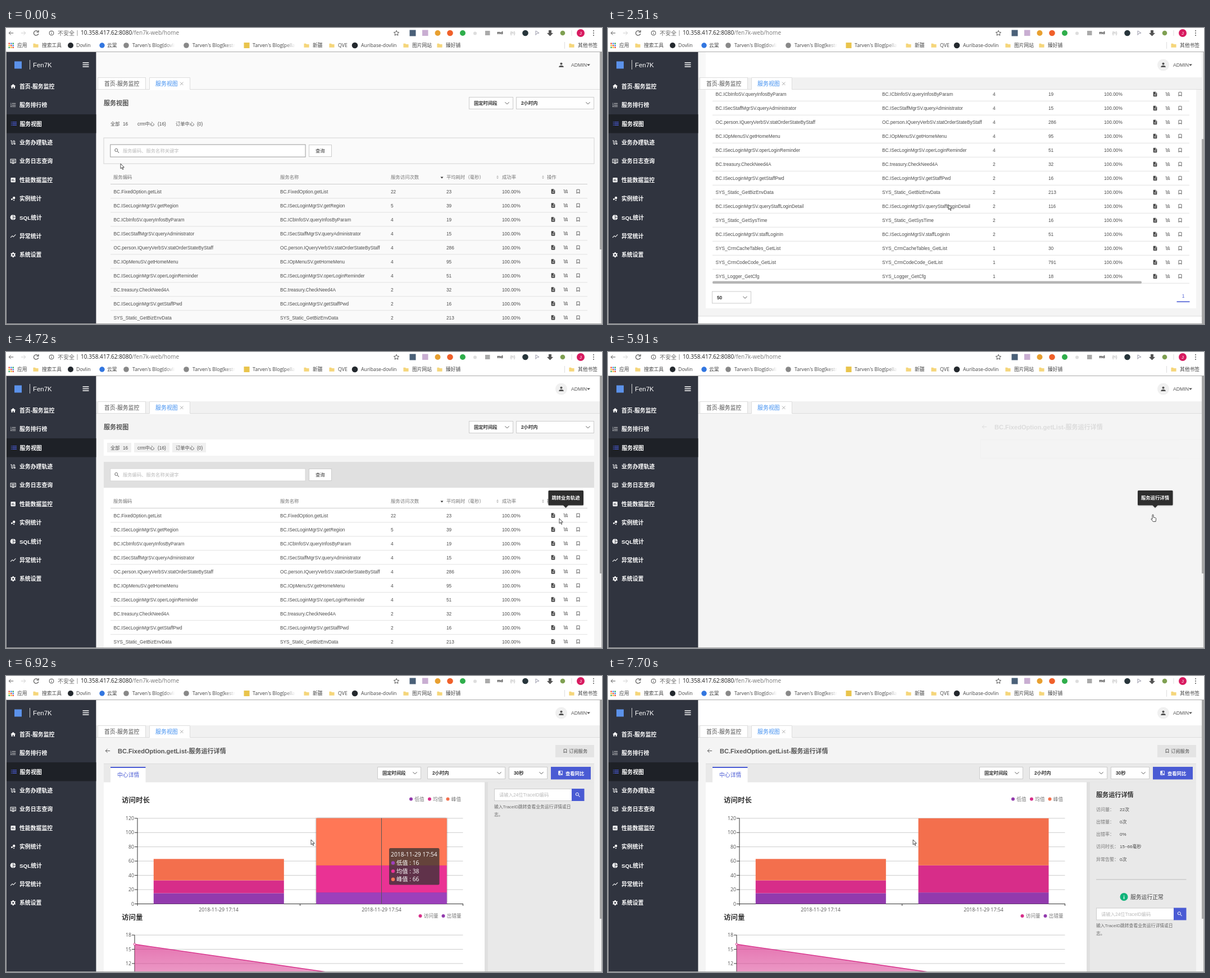
An HTML page that plays this animation: 1061 by 528 pixels, repeating every 8 s.

```html
<!DOCTYPE html>
<html lang="zh">
<head>
<meta charset="utf-8">
<title>服务视图</title>
<style>
html, body { margin: 0; width: 100%; height: 100%; overflow: hidden; background: #fff; }
svg { display: block; width: 1061px; height: 528px; font-family: "Liberation Sans", "Noto Sans CJK SC", sans-serif; }
.ui { font-family: "Open Sans", "Noto Sans CJK SC", sans-serif; }
.page { fill: #f4f4f4; }
.head, .sheet { fill: #fff; }
.strip { fill: #f1f1f1; }
.chip { fill: #f0f0f0; }
.band { fill: #e0e0e0; }
.flat .page, .flat .head, .flat .strip { fill: #fafafa; }
.flat .sheet, .flat .chip, .flat .avatar { fill: none; }
.flat .band { fill: none; stroke: #d4d4d4; }
</style>
</head>
<body>
<svg id="stage" viewBox="0 0 1061 528" xmlns="http://www.w3.org/2000/svg"></svg>
<script>
const BLUE = '#4a5bd4', PURPLE = '#923aad', PINK = '#d72d89', ORANGE = '#f36f4d';
const HOT = ['#9c3fbb', '#ea3094', '#ff7757'], COOL = [PURPLE, PINK, ORANGE];

const rect = (x, y, w, h, fill, more = '') =>
  `<rect x="${x}" y="${y}" width="${w}" height="${h}" ${fill ? `fill="${fill}"` : ''} ${more}/>`;
const box = (x, y, w, h, fill = '#fff', line = '#ccc') => rect(x + .5, y + .5, w - 1, h - 1, fill, `stroke="${line}"`);
const dot = (x, y, r, fill, more = '') => `<circle cx="${x}" cy="${y}" r="${r}" fill="${fill}" ${more}/>`;
const text = (x, y, s, size = 8.3, fill = '#4c4c4c', more = '') =>
  `<text x="${x}" y="${y}" font-size="${size}" fill="${fill}" ${more}>${s}</text>`;
const line = (d, color, w = 1, more = '') => `<path d="${d}" fill="none" stroke="${color}" stroke-width="${w}" ${more}/>`;
const group = (id, body, more = '') => `<g id="${id}" ${more}>${body}</g>`;
const BOLD = 'font-weight="700"', MID = 'text-anchor="middle"', END = 'text-anchor="end"';

// Icon paths on a 24 unit grid; stroked ones start with "~".
const ICONS = {
  home: 'M10 20v-6h4v6h5v-8h3L12 3 2 12h3v8z',
  ranks: 'M2 17h2v.5H3v1h1v.5H2v1h3v-4H2zm1-9h1V4H2v1h1zm-1 3h1.8L2 13.1v.9h3v-1H3.2L5 10.9V10H2zM7 5v2h15V5zm0 14h15v-2H7zm0-6h15v-2H7z',
  list: 'M1 4h3v3H1zm0 6h3v3H1zm0 6h3v3H1zM6 4h17v3H6zm0 6h17v3H6zm0 6h17v3H6z',
  track: '~M2 5h4v11a3 3 0 0 0 6 0V8a3 3 0 0 1 6 0v11M15 16l3 3 3-3',
  log: '~M2 4h20v14H2zM8 21h8M6 9h12M6 13h12',
  stats: 'M19 3H5a2 2 0 0 0-2 2v14a2 2 0 0 0 2 2h14a2 2 0 0 0 2-2V5a2 2 0 0 0-2-2zM9 17H7v-7h2zm4 0h-2V7h2zm4 0h-2v-4h2z',
  bubbles: 'M4 14.4a3.2 3.2 0 1 0 6.4 0 3.2 3.2 0 1 0-6.4 0zm8.8 4a2.2 2.2 0 1 0 4.4 0 2.2 2.2 0 1 0-4.4 0zm-2.4-9.6a4.8 4.8 0 1 0 9.6 0 4.8 4.8 0 1 0-9.6 0z',
  pie: 'M11 2v20a10 10 0 0 1 0-20zm2 0v9h9a10 10 0 0 0-9-9zm0 11v9a10 10 0 0 0 9-9z',
  trend: '~M2 18l7-7 4 4 9-9',
  gear: 'M10 2h4l.6 3 2 1.1 2.9-1 2 3.5-2.3 2v2.8l2.3 2-2 3.5-2.9-1-2 1.1-.6 3h-4l-.6-3-2-1.1-2.9 1-2-3.5 2.3-2v-2.8l-2.3-2 2-3.5 2.9 1 2-1.1zm2 6.5a3.5 3.5 0 1 0 0 7 3.5 3.5 0 0 0 0-7z',
  doc: 'M14 2H6a2 2 0 0 0-2 2v16c0 1.1.9 2 2 2h12a2 2 0 0 0 2-2V8zm2 16H8v-2h8zm0-4H8v-2h8zm-3-5V3.5L18.5 9z',
  mark: 'M17 3H7a2 2 0 0 0-2 2v16l7-3 7 3V5a2 2 0 0 0-2-2zm0 15l-5-2.2L7 18V5h10z',
  search: 'M15.5 14h-.8l-.3-.3A6.5 6.5 0 1 0 9.5 16c1.6 0 3.1-.6 4.2-1.6l.3.3v.8l5 5 1.5-1.5zm-6 0a4.5 4.5 0 1 1 0-9 4.5 4.5 0 0 1 0 9z',
  user: 'M12 12a4 4 0 1 0 0-8 4 4 0 0 0 0 8zm0 2c-2.7 0-8 1.3-8 4v2h16v-2c0-2.7-5.3-4-8-4z',
  folder: 'M1 4h9l2 3h11v14H1z',
  back: '~M22 12H3M11 4l-8 8 8 8',
  compare: 'M10 3H3v18h7v2h2V1h-2zm0 15H5l5-6zM14 3v2h5v13l-5-6v9h7V3z'
};
const icon = (name, x, y, size, color) => {
  const d = ICONS[name], open = d[0] === '~';
  const paint = open ? `fill="none" stroke="${color}" stroke-width="2.3"` : `fill="${color}" fill-rule="evenodd"`;
  return `<path d="${open ? d.slice(1) : d}" ${paint} transform="translate(${x - size / 2} ${y - size / 2}) scale(${size / 24})"/>`;
};
const chevron = (x, y) => line(`M${x - 3.5} ${y - 1.7}l3.5 3.5 3.5-3.5`, '#555');
const select = (x, y, w, s) => box(x, y, w, 22) + text(x + 9, y + 14, s, 8.3, '#333', BOLD) + chevron(x + w - 11, y + 11);

function browserBar() {
  const ink = '#555';
  let s = rect(0, 0, 1061, 43, '#fff') + icon('back', 9, 9, 10, ink) +
    `<g transform="rotate(180 31 9)">${icon('back', 31, 9, 10, '#ccc')}</g>` +
    line('M57 6.5a4.2 4.2 0 1 0 .7 3.5M58 4v3.5h-3.5', ink, 1.2) +
    dot(81, 9, 4, 'none', `stroke="${ink}"`) + line('M81 8.5v2.7M81 6.3v1', ink) +
    text(92, 12.6, '不安全', 10, '#666') + line('M127 4v10', '#999') +
    text(133, 12.3, '10.358.417.62:8080<tspan fill="#777">/fen7k-web/home</tspan>', 10.07, '#222', 'class="ui"') +
    line('M695 4.5l1.4 3 3.2.3-2.4 2.2.7 3.2-2.9-1.7-2.9 1.7.7-3.2-2.4-2.2 3.2-.3z', ink) +
    rect(718.5, 3.5, 11, 11, '#4a6078') + rect(741, 3.5, 10.5, 10.5, '#c9aed2') +
    dot(768.5, 9, 5, '#e8a030') + dot(790.5, 9, 5.3, '#f0602a') + dot(813, 9, 5, '#2fae4b') +
    dot(835, 9.5, 3, '#ddd') + rect(853, 5, 8.5, 8, '#aaa') +
    text(879.5, 11, 'md', 7, '#222', MID + ' ' + BOLD) + text(902, 11, '{n}', 7, '#999', MID) +
    dot(924.5, 9, 5.3, '#27353b') + line('M943 5l6 4-4 .5-2 3z', '#99a') +
    '<path d="M966 4h5v5h3l-5.500 5.500L963 9h3z" fill="#555"/>' + dot(991, 9, 4.3, '#7fa052') +
    line('M1007 4v10', '#ddd') + dot(1023, 9, 7, '#d81b60') + text(1023, 11.8, 'J', 8, '#fff', MID);
  for (const y of [5, 9, 13]) s += dot(1046, y, 1, ink);
  ['#e64c3c', '#3f87e8', '#37a859', '#f2b51d'].forEach((c, i, all) => {
    for (let k = i; k < 9; k += all.length) s += rect(4.5 + k % 3 * 3.5, 26.5 + Math.floor(k / 3) * 3.5, 2.4, 2.4, c);
  });
  const label = (x, str) => text(x, 34.3, str, 8.75, '#444', 'class="ui"');
  const folder = (x, str) => icon('folder', x, 31, 10, '#f5d67b') + label(x + 11, str);
  s += label(20, '应用') + folder(53, '搜索工具') + dot(115, 31, 5, '#24292e') + label(125, 'Dovlin') +
    dot(171, 31, 4.7, '#3276e0') + label(180, '云棠');
  [['dovlin', 225], ['kestro', 332], ['pellan', 439]].forEach(([site, x], i) => {
    s += i < 2 ? dot(x - 11, 31, 4.8, '#888') : rect(x - 15.5, 26, 10, 10, '#e9c44c');
    s += label(x, `Tarven's Blog(${site.slice(0, 5)}`) + rect(x + 58, 24, 24, 14, 'url(#fade)');
  });
  return s + folder(535, '新疆') + folder(580, 'QVE') + dot(621, 31, 5.3, '#24292e') + label(632, 'Auribase-dovlin') +
    folder(712, '图片网站') + folder(772, '臻好铺') + line('M994.500 25v12', '#ddd') + folder(1007, '其他书签') +
    line('M0 42.500H1061', '#aaa');
}

function sidebar() {
  const items = [['home', '首页-服务监控'], ['ranks', '服务排行榜'], ['list', '服务视图'], ['track', '业务办理轨迹'], ['log', '业务日志查询'],
    ['stats', '性能数据监控'], ['bubbles', '实例统计'], ['pie', 'SQL统计'], ['trend', '异常统计'], ['gear', '系统设置']];
  let s = rect(0, 43, 160.4, 485, '#30343f') + rect(0, 154, 160.4, 33.5, '#1e2127') +
    rect(15, 59.5, 13, 13, '#5c92ea') + line('M42.500 57v17', '#ccc') + text(48, 69.5, 'Fen7K', 11.4, '#fff') +
    line('M136.500 62h11M136.500 65.500h11M136.500 69h11', '#fff', 1.6);
  items.forEach(([name, str], i) => {
    const y = 104 + i * 33.4, on = i === 2;
    s += icon(name, on ? 14 : 12.7, y, 11, on ? BLUE : '#fff') + text(on ? 24.5 : 24, y + 3.7, str, 9.85, '#fff', BOLD);
  });
  return s;
}

function header() {
  return rect(160, 43, 897, 45, '', 'class="head"') + group('edge', rect(160, 43, 14, 45, '#f8f8f8')) +
    rect(160, 88, 897, 22, '', 'class="strip"') + dot(988.5, 66, 10.5, '#f0f0f0', 'class="avatar"') +
    icon('user', 988.5, 65.8, 12.5, '#555') + text(1006, 69, 'ADMIN', 8.7, '#555') + '<path d="M1034 64.500h6l-3 3.300z" fill="#555"/>' +
    line('M160 109.500H1057', '#ddd') + box(163, 88, 86, 22, '#fff', '#ddd') + text(175, 102.8, '首页-服务监控', 9.85) +
    rect(255, 88, 73, 23, '#fff') + line('M255.500 110V88.500H327.500V110', '#ddd') + text(266, 102.8, '服务视图', 9.95, '#3e8ef0') +
    line('M310 96.500l5.500 5.500M315.500 96.500l-5.500 5.500', '#999', .8);
}

const ROWS = [['BC.FixedOption.getList', 22, 23], ['BC.ISecLoginMgrSV.getRegion', 5, 39], ['BC.ICbInfoSV.queryInfosByParam', 4, 19],
  ['BC.ISecStaffMgrSV.queryAdministrator', 4, 15], ['OC.person.IQueryVerbSV.statOrderStateByStaff', 4, 286], ['BC.IOpMenuSV.getHomeMenu', 4, 95],
  ['BC.ISecLoginMgrSV.operLoginReminder', 4, 51], ['BC.treasury.CheckNeed4A', 2, 32], ['BC.ISecLoginMgrSV.getStaffPwd', 2, 16],
  ['SYS_Static_GetBizEnvData', 2, 213], ['BC.ISecLoginMgrSV.queryStaffLoginDetail', 2, 116], ['SYS_Static_GetSysTime', 2, 16],
  ['BC.ISecLoginMgrSV.staffLoginIn', 2, 51], ['SYS_CrmCacheTables_GetList', 1, 30], ['SYS_CrmCodeCode_GetList', 1, 791], ['SYS_Logger_GetCfg', 1, 18]];

function footer(y) {
  return rect(160, y, 897, 60, '#fff') + line(`M160 ${y}H1057`, '#ddd');
}

function listPage() {
  let s = text(174, 138, '服务视图', 11.05, '#555', BOLD) + select(824, 123, 79, '固定时间段') + select(908, 123, 139, '2小时内') +
    rect(174, 156, 873, 29, '', 'class="sheet"');
  for (const [x, w, name, cx, n] of [[180, 43, '全部', 208, '16'], [228, 63, 'crm中心', 270, '(16)'], [296, 60, '订单中心', 340, '(0)']])
    s += rect(x, 162, w, 17, '', 'class="chip"') + text(x + 6, 173.5, name) + text(cx, 173.5, n);
  s += rect(174, 196, 873, 46, '', 'class="band"') + rect(174, 242.5, 873, 481, '', 'class="sheet"') +
    group('patchA', rect(186, 230, 347, 12, '#e0e0e0') + rect(184, 243, 350, 23, '#fff')) +
    group('patchB', rect(174, 205, 44, 37, '#e0e0e0') + rect(174, 243, 97, 29, '#fff')) +
    rect(185.8, 208, 347.2, 22, '#fff', 'id="query"') + icon('search', 197.5, 219, 11, '#666') +
    text(208, 222.3, '服务编码、服务名称关键字', 8.3, '#bbb') + box(539, 208, 41, 22) + text(551, 222.3, '查询', 8.3, '#333');
  for (const [x, str] of [[191, '服务编码'], [488, '服务名称'], [685, '服务访问次数'], [784, '平均耗时（毫秒）'], [883, '成功率'], [963, '操作']])
    s += text(x, 269, str, 8.4, '#777');
  s += '<path d="M773.500 265.500h5l-2.500 3z" fill="#333"/>';
  for (const x of [875, 956]) s += `<path d="M${x - 2} 265.500h4l-2-2.500zm0 1.200h4l-2 2.500z" fill="#bbb"/>`;
  s += line('M186 278.500H1035', '#ccc');
  ROWS.forEach(([name, count, ms], i) => {
    const y = 291.5 + i * 25, b = y + 3.2;
    s += text(191.5, b, name) + text(488, b, name) + text(685, b, count) + text(784, b, ms) + text(883, b, '100.00%') +
      icon('doc', 974, y, 10, '#444') + icon('track', 996.5, y, 9.5, '#555') + icon('mark', 1018.5, y, 10, '#444') +
      line(`M186 ${y + 12.3}H1035`, '#e2e2e2');
  });
  return s + rect(186, 675, 764, 4.5, '#b5b5b5', 'rx="2"') + select(185, 693, 70, '50') +
    text(1024, 704.5, '1', 8.3, BLUE, MID) + rect(1012.5, 711, 23, 1.6, BLUE) + footer(737.5);
}

function legend(items, y) {
  return items.map(([x, str, c]) => dot(x, y, 3, c) + text(x + 6.3, y + 3.2, str, 8.6, '#777')).join('');
}

function axis(x, bottom, step, count, unit) {
  let s = '';
  for (let i = 0; i <= count; i++) {
    const y = bottom - i * step;
    if (i) s += line(`M${x} ${y}H813.500`, '#ccc');
    s += line(`M${x - 5} ${y}h5`, '#333') + text(x - 6, y + 3.2, i * unit, 8.8, '#555', END + ' class="ui"');
  }
  return s + line(`M${x} ${bottom - count * step}V${bottom}H813.500`, '#333');
}

function bar(x, parts, colors) {
  let y = 406.5;
  return parts.map((v, i) => rect(x, y -= v * 1.2725, 232, v * 1.2725, colors[i])).join('');
}

function charts() {
  const small = 'class="ui" ' + MID, top = 478.5, end = 563.2;
  const tip = ['低值 : 16', '均值 : 38', '峰值 : 66'].map((str, i) => dot(689, 333.5 + i * 14.6, 3.2, HOT[i]) +
    text(695, 337 + i * 14.6, str, 10.3, '#fff', 'class="ui"')).join('');
  return text(206, 226, '访问时长', 12.5, '#333', BOLD) + legend([[721, '低值', PURPLE], [754, '均值', PINK], [786.5, '峰值', ORANGE]], 219.5) +
    axis(234, 406.5, 25.45, 6, 20) + line('M234 406v4M523.500 406v4M813.500 406v4', '#333') +
    text(378.5, 419.5, '2018-11-29 17:14', 8.8, '#555', small) + text(668.5, 419.5, '2018-11-29 17:54', 8.8, '#555', small) +
    group('bars', bar(262.8, [15, 18, 30], COOL) + bar(552.5, [16, 38, 66], COOL) +
      group('hot', bar(552.5, [16, 38, 66], HOT), 'filter="url(#glow)"')) +
    text(206, 434.5, '访问量', 12.5, '#333', BOLD) + legend([[737.5, '访问量', PINK], [778.5, '出错量', PURPLE]], 428) +
    axis(229, 614.5, 25.4, 6, 3) + text(229, 627.5, '2018-11-29 17:14', 8.8, '#555', small) + text(810, 627.5, '2018-11-29 17:54', 8.8, '#555', small) +
    `<g clip-path="url(#sweep)"><path d="M229 ${top}L813.500 ${end}V614.500H229z" fill="url(#area)"/>` +
    line(`M229 ${top}L813.500 ${end}`, PINK, 1.4) + line('M229 614.500H813.500', PURPLE, 1.4) + '</g>' +
    dot(229, top, 1.8, '#fff', `stroke="${PINK}"`) +
    group('hover', line('M668.500 253.500V406.500', '#555') + rect(682, 307, 89.5, 65.5, '#323232', 'rx="2.500" opacity=".75"') +
      text(685, 322, '2018-11-29 17:54', 10.3, '#fff', 'class="ui"') + tip);
}

function sidePanel() {
  const facts = [['访问量：', '22次'], ['出错量：', '0次'], ['出错率：', '0%'], ['访问时长：', '15~66毫秒'], ['异常告警：', '0次']];
  return group('facts', text(869, 216, '服务运行详情', 11.1, '#333', BOLD) +
      facts.map(([k, v], i) => text(869, 240.7 + i * 22.2, k, 8, '#777') + text(911, 240.7 + i * 22.2, v, 8, '#444')).join('') +
      line('M869 363H1029.500', '#bbb') + dot(918.5, 394, 7, '#11b37a') + text(918.5, 397.5, 'i', 9.5, '#fff', MID + ' ' + BOLD) +
      text(930, 397.5, '服务运行正常', 9.8, '#444')) +
    group('trace', box(869, 201, 139, 22) + text(878, 215, '请输入24位TraceID编码', 8.3, '#bbb') + rect(1007, 201, 22.5, 22, BLUE) +
      icon('search', 1018, 212, 11, '#fff') + text(869, 235.7, '输入TraceID跳转查看业务运行详情或日', 7.8, '#666') + text(869, 249.5, '志。', 7.8, '#666'));
}

function detailPage() {
  return icon('back', 181, 133.5, 10, '#555') + text(199, 137.7, 'BC.FixedOption.getList-服务运行详情', 11.05, '#555', BOLD) +
    box(174, 156, 873, 34, 'none', '#ddd') +
    group('loaded', rect(174, 156, 873, 33.5, '#e9e9e9') + line('M174 156.500H1047', '#ddd') +
      rect(978, 123, 69, 22, '#e4e4e4') + icon('mark', 995.5, 133.7, 9.5, '#444') + text(1002, 137, '订阅服务') +
      rect(186, 162, 62.5, 28, '#fff') + rect(186, 162, 62.5, 2, BLUE) + text(198, 179.5, '中心详情', 9.85, BLUE) +
      select(661, 162, 78, '固定时间段') + select(750, 162, 139, '2小时内') + select(895, 162, 69, '30秒') +
      rect(970, 162, 71, 22.5, BLUE) + icon('compare', 987, 173, 10, '#fff') + text(996, 176.5, '查看同比', 8.3, '#fff', BOLD) +
      rect(174, 189.5, 678, 462, '#fff') + rect(852, 189.5, 6, 462, '#e0e0e0') + rect(858, 189.5, 189, 462, '#e9e9e9') +
      charts() + sidePanel() + footer(666));
}

const tooltip = (id, x, str) => group(id, rect(x - 31, 247, 62.5, 26.5, '#2d2d2d', 'rx="1.500"') +
  `<path d="M${x - 5} 273h10l-5 5z" fill="#2d2d2d"/>` + text(x, 262.5, str, 8.4, '#fff', MID + ' ' + BOLD), 'filter="url(#soft)"');

const stage = document.getElementById('stage');
stage.innerHTML = `<defs>
  <linearGradient id="fade"><stop offset="0" stop-color="#fff" stop-opacity="0"/><stop offset=".75" stop-color="#fff"/></linearGradient>
  <linearGradient id="area" x1="0" y1="0" x2="0" y2="1"><stop offset="0" stop-color="${PINK}" stop-opacity=".66"/><stop offset="1" stop-color="${PINK}" stop-opacity=".2"/></linearGradient>
  <filter id="glow"><feDropShadow dx="0" dy="0" stdDeviation="1.500" flood-opacity=".5"/></filter>
  <filter id="soft"><feDropShadow dx="0" dy="1" stdDeviation="1" flood-opacity=".18"/></filter>
  <clipPath id="view"><rect x="160" y="110" width="897" height="418"/></clipPath>
  <clipPath id="sweep"><rect id="sweepBox" x="227" y="440" width="590" height="180"/></clipPath></defs>` +
  rect(160, 43, 901, 485, '', 'class="page"') + header() +
  `<g clip-path="url(#view)">${group('list', listPage())}${group('detail', detailPage())}</g>` +
  rect(1057, 43, 4, 485, '#f1f1f1') + rect(1057, 43, 4, 352, '#a8a8a8', 'id="thumb"') + sidebar() + browserBar() +
  line('M.5 43V527.500H1060.500V43', '#a4a4a4') + tooltip('tipDetail', 974, '服务运行详情') + tooltip('tipTrack', 996.5, '跳转业务轨迹') +
  group('arrow', '<path d="M0 0V8.800L2 7 3.600 10.400 5 9.800 3.400 6.500H6.300z" fill="#fff" stroke="#222" stroke-width=".8"/>') +
  group('hand', '<path d="M-1 6V1a1 1 0 0 1 2 0v4l3.800.900q1 .300.900 1.500L5 12.500H.300L-3 8.400c-.500-1 .700-1.500 2 0z" fill="#fff" stroke="#222" stroke-width=".8"/>');

// Pointer stops: time, x, y, then 1 for the hand shape.
const POINTER = [[0, 204, 242], [120, 222, 252], [320, 262, 261], [442, 215, 250], [565, 165, 232], [687, 110, 212, 1], [810, 68, 194, 1],
  [960, 62, 184, 1], [1080, 54, 172, 1], [1350, 180, 215], [1470, 330, 262], [1590, 470, 300], [1710, 579, 322], [1860, 582, 318],
  [2170, 584, 315], [2510, 606, 315], [2730, 720, 311], [2870, 825, 285], [3090, 951, 262], [3240, 958, 276], [3360, 966, 286],
  [3480, 970, 290, 1], [3720, 972, 290, 1], [4120, 981, 291], [4240, 991, 291, 1], [4360, 996, 290, 1], [4480, 993, 293, 1],
  [4720, 985, 297], [4870, 981, 297], [4990, 975, 292, 1], [5350, 970, 290, 1], [6060, 968, 302], [6320, 820, 300], [6540, 700, 300],
  [6770, 600, 296], [6920, 543, 292]];

const $ = id => document.getElementById(id);
const show = (id, on) => $(id).setAttribute('display', on ? 'inline' : 'none');
const move = (id, x, y) => $(id).setAttribute('transform', `translate(${x} ${y})`);

function render(t) {
  const within = (from, to) => t >= from && t < to;
  const [step, x, y, hand] = POINTER.filter(p => p[0] <= t).pop();
  show('arrow', !hand);
  show('hand', hand);
  move(hand ? 'hand' : 'arrow', x, y);

  stage.setAttribute('class', t < 1860 ? 'flat' : '');
  show('edge', within(1860, 2730));
  show('patchA', within(120, 1860));
  show('patchB', within(320, 1860));
  $('query').setAttribute('stroke', t < 120 ? '#999' : '#d5d5d5');

  const scroll = within(1860, 2170) ? 110 : within(2170, 2730) ? 223.5 : within(7060, 7700) ? 152 : 0;
  const thumb = t < 6320 ? 352 : 390;
  $('thumb').setAttribute('height', thumb);
  $('thumb').setAttribute('y', 43 + scroll * thumb / 507);

  show('list', t < 5910);
  move('list', 0, -scroll);
  show('detail', t >= 5910);
  move('detail', t < 6060 ? 489 : t < 6320 ? 245 : 0, -scroll);
  $('detail').setAttribute('opacity', t < 6060 ? .15 : t < 6320 ? .6 : 1);
  show('loaded', t >= 6320);

  const grown = 1 - (1 - Math.min(1, Math.max(0, (step - 6280) / 640))) ** 3;
  $('bars').setAttribute('transform', `translate(0 ${406.5 * (1 - grown)}) scale(1 ${grown})`);
  $('sweepBox').setAttribute('width', 590 * grown);
  show('hot', within(6540, 7330));
  show('hover', within(6540, 7330));
  show('facts', t >= 7060);
  move('trace', 0, t < 7060 ? 0 : 212.5);

  show('tipDetail', within(3480, 4240) || within(4990, 6060));
  show('tipTrack', within(4240, 4990));
}

function tick(now) {
  render(now % 8000);
  requestAnimationFrame(tick);
}
render(0);
requestAnimationFrame(tick);
</script>
</body>
</html>
```
